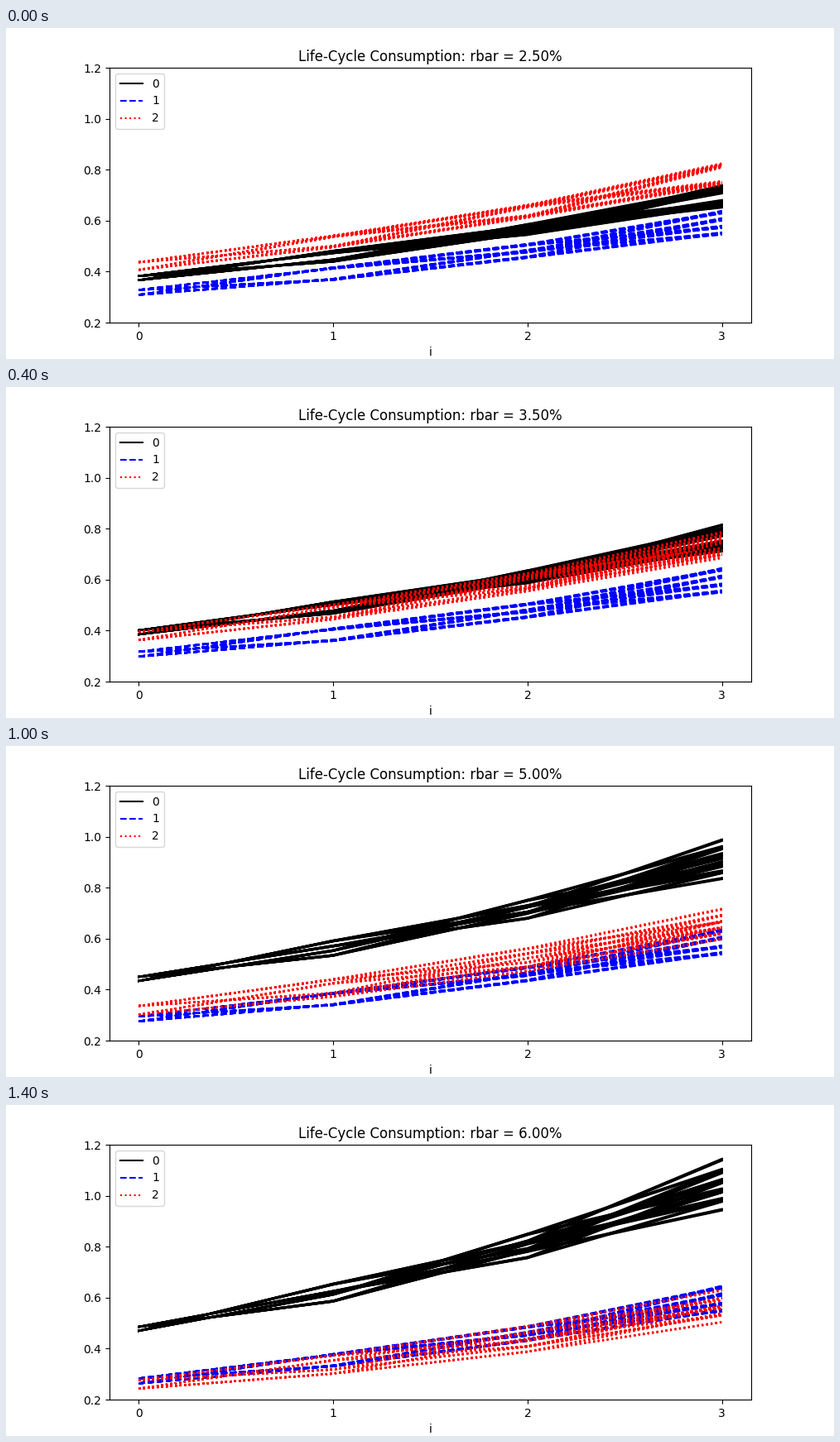
Recreate the animation shown at these times as a matplotlib script. Size 1000 by 400 pixels, loop 1.6 s.

```python
import itertools

import matplotlib.pyplot as plt
import numpy as np
from matplotlib.animation import FuncAnimation

N = 8
AGES = np.arange(4)
RATES = np.linspace(2.5, 6.0, N)

# Key points: consumption growth per period, shared by all types
KEY_RATES = [2.5, 3.5, 4.5, 5.0, 5.5, 6.0]
GROWTH = [0.2056, 0.2205, 0.234, 0.2400, 0.2530, 0.2590]

# Binary shocks at each age, repeated for a few small offsets from before birth
SHOCKS = np.array(list(itertools.product([1, -1], repeat=4)) * 4)
OFFSETS = np.repeat(np.linspace(-0.0035, 0.0035, 4), 16)[:, None]

# start: consumption at age 0 for the key rates
# impact, drift: effect of the current shock and its change over the sweep
# carry: lasting effect of past shocks, first and last; weight: by age of shock
TYPES = [
    dict(
        style="k-",
        start=[0.3744, 0.393, 0.4255, 0.442, 0.4565, 0.4775],
        impact=[0.0215, 0.0365, 0.021, 0.041],
        drift=-0.005,
        carry=(0.0065, 0.0195),
        weight=[-1.15, -0.95, -0.9],
    ),
    dict(
        style="b--",
        start=[0.3184, 0.3073, 0.298, 0.285, 0.290, 0.273],
        impact=[0.030, 0.057, 0.028, 0.048],
        drift=0.006,
        carry=(0.023, 0.023),
        weight=[-0.12, 1, -0.12],
    ),
    dict(
        style="r:",
        start=[0.4217, 0.3787, 0.333, 0.3186, 0.2705, 0.259],
        impact=[0.0355, 0.039, 0.032, 0.044],
        drift=np.array([0.028, 0.041, 0.030, -0.011]),
        carry=(0.0025, 0.026),
        weight=[1, 1, 1],
    ),
]


def consumption(kind, rate):
    """Life-cycle paths, one row per shock history."""
    start = np.interp(rate, KEY_RATES, kind["start"])
    first, last = kind["start"][0], kind["start"][-1]
    u = (start - first) / (last - first)

    low, high = kind["carry"]
    carry = (low + (high - low) * u) * np.array(kind["weight"])
    past = np.zeros(SHOCKS.shape)
    past[:, 1:] = np.cumsum(SHOCKS[:, :3] * carry, axis=1)

    impact = np.array(kind["impact"]) + kind["drift"] * u
    trend = np.interp(rate, KEY_RATES, GROWTH) * AGES
    offset = OFFSETS * np.where(AGES > 0, 1, 0.4)
    return start * np.exp(trend + past + SHOCKS * impact + offset)


fig, ax = plt.subplots(figsize=(10, 4), dpi=100)
groups = [
    ax.plot(AGES, consumption(kind, RATES[0]).T, kind["style"]) for kind in TYPES
]
ax.set_ylim(0.2, 1.2)
ax.set_xticks(AGES)
ax.set_xlabel("i")
ax.legend([g[0] for g in groups], ["0", "1", "2"], loc="upper left")
title = ax.set_title("")


def update(n):
    for kind, lines in zip(TYPES, groups):
        for line, path in zip(lines, consumption(kind, RATES[n])):
            line.set_ydata(path)
    title.set_text(f"Life-Cycle Consumption: rbar = {RATES[n]:.2f}%")
    return [title, *itertools.chain(*groups)]


anim = FuncAnimation(fig, update, frames=N, interval=200, repeat=True, repeat_delay=0)
plt.show()
```
